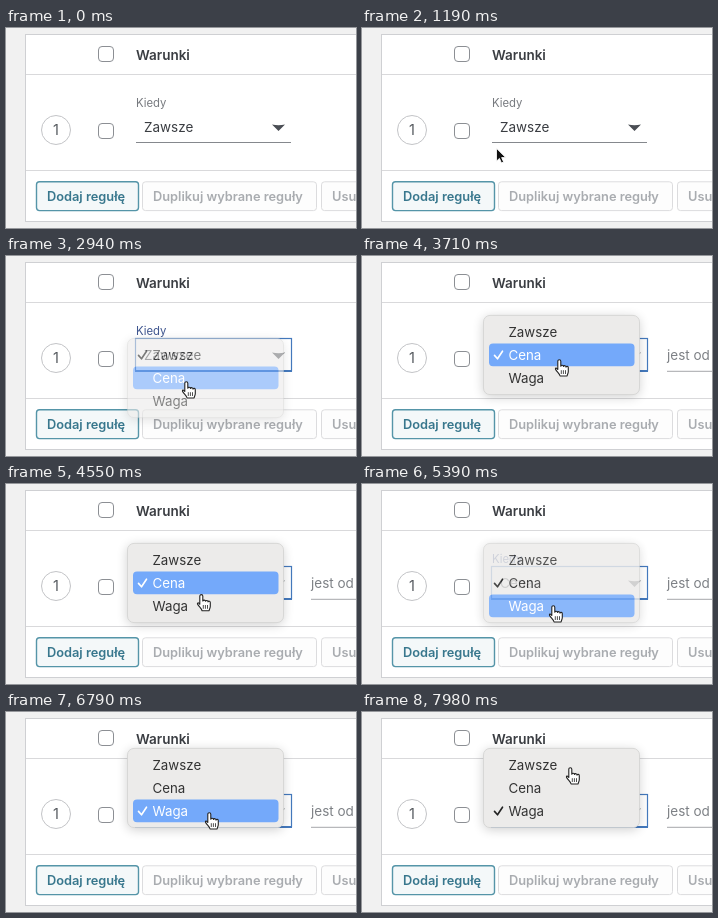
An HTML page that plays this animation: 350 px wide and 200 px high, repeating every 8 s.

```html
<!DOCTYPE html>
<html lang="pl">
<head>
<meta charset="utf-8">
<title>Warunki</title>
<style>
html, body { margin: 0; width: 100%; height: 100%; overflow: hidden; background: #f1f1f1; }
svg { display: block; width: 100%; height: 100%; }
text { font-family: Inter, Roboto, "Liberation Sans", sans-serif; fill: #3a3d42; }
.line { stroke: #d9d9db; fill: none; }
.box { fill: #fff; stroke: #8c8f94; }
.btn text { font-size: 12.8px; font-weight: 600; fill: #a9acb0; }
.btn rect { fill: #fdfdfd; stroke: #dcdcde; }
.btn.main text { fill: #38778d; }
.btn.main rect { fill: #f4f8f9; stroke: #5595a8; stroke-width: 1.4; }
.value { font-size: 13.5px; }
.item { font-size: 13.3px; }
</style>
</head>
<body>
<svg viewBox="0 0 350 200">
  <defs>
    <filter id="blur" x="-20%" y="-30%" width="140%" height="160%">
      <feGaussianBlur stdDeviation="5.5"/>
    </filter>
  </defs>

  <rect width="350" height="200" fill="#f1f1f1"/>
  <rect x="19.5" y="6.5" width="340" height="187" fill="#fff" stroke="#cfd0d3"/>
  <path class="line" d="M20 46.5H350M20 142.5H350"/>

  <rect class="box" x="92.5" y="18.5" width="15" height="15" rx="3.5"/>
  <rect class="box" x="92.5" y="95.5" width="15" height="15" rx="3.5"/>
  <text x="130" y="32" font-size="13.5" font-weight="600">Warunki</text>
  <circle cx="50" cy="102" r="14.5" fill="#fff" stroke="#c3c4c7"/>
  <text x="50" y="107.3" font-size="14.5" text-anchor="middle" style="fill:#55595e">1</text>

  <g class="btn main">
    <rect x="30.5" y="153.8" width="102" height="28.8" rx="3"/>
    <text x="41" y="172.9">Dodaj regułę</text>
  </g>
  <g class="btn">
    <rect x="136.5" y="153.8" width="174" height="28.8" rx="3"/>
    <text x="147" y="172.9">Duplikuj wybrane reguły</text>
    <rect x="315.5" y="153.8" width="130" height="28.8" rx="3"/>
    <text x="326" y="172.9">Usuń wybrane</text>
  </g>

  <text id="label" x="130" y="78.5" font-size="11.3">Kiedy</text>
  <path d="M130 114.5H285" stroke="#85888d"/>
  <g id="focus" fill="none" stroke="#4479bd">
    <rect x="129.5" y="82.5" width="156" height="32.2" stroke-width="1.2"/>
    <path d="M129 115H286" stroke-width="2"/>
  </g>
  <text id="value" class="value" x="138" y="104.3"></text>
  <path d="M266 96.5q6.5 1.6 13 0L272.5 103z" fill="#4a4e54"/>
  <g id="extra">
    <text class="value" x="305" y="103.9" style="fill:#7d8085">jest od</text>
    <path d="M305 115.3H350" stroke="#a5a7ab"/>
  </g>

  <g id="menu">
    <rect x="121" y="2" width="156.5" height="80" rx="7" opacity=".18" filter="url(#blur)"/>
    <rect x="121.5" y=".4" width="156" height="79.2" rx="6.5" fill="#ecebea" stroke="#d2d2d1" stroke-width=".8"/>
    <rect id="bar" x="127" width="145.5" height="22.8" rx="4" fill="#74a9fa"/>
    <g id="items"></g>
    <path id="check" d="M132.5 12.8l3 3.4 5-7.6" fill="none" stroke-width="1.6" stroke-linecap="round" stroke-linejoin="round"/>
  </g>

  <g id="cursor">
    <path id="arrow" d="M0 0V13l3-2.8 2 4.6 2.2-1-2-4.4H9.3z" fill="#111" stroke="#fff" stroke-width=".9"/>
    <g id="hand" transform="translate(.3 1)" stroke="#222" stroke-linejoin="round" stroke-linecap="round">
      <path fill="#fff" stroke-width="1.1" d="M-1.5 9.5V1.3a1.5 1.5 0 0 1 3 0V6.2a1.4 1.4 0 0 1 2.7 .3a1.3 1.3 0 0 1 2.5 .6a1.2 1.2 0 0 1 2.3 .6V11.5c0 2-1 2.6-1.2 4.5H.8C.3 13.6-2 12.3-3.6 9.6c-.9-1.5 .8-2.4 2.1-.1z"/>
      <path fill="none" stroke-width=".8" d="M2 10.6v3M4.1 10.6v3M6.2 10.6v3"/>
    </g>
  </g>
</svg>
<script>
const LOOP = 8000, STEP = 70, ROW = 23, PAD = 5.4;
const OPTIONS = ['Zawsze', 'Cena', 'Waga'];
// Each visit to the menu: checked row, chosen row, opening and click times
const VISITS = [
  { from: 0, to: 1, open: 1610, pick: 2660 },
  { from: 1, to: 2, open: 3570, pick: 5180 },
  { from: 2, to: 0, open: 6300, pick: 7980 }
];
// Pointer stops: time, x, y
const PATH = [
  [630, -10, 158], [1470, 185, 107], [2030, 185, 107], [2520, 180, 125],
  [2940, 180, 125], [3430, 197, 103], [4060, 197, 103], [4550, 195, 109.8],
  [4900, 191, 121], [5390, 191, 121], [5810, 203, 100], [7140, 203, 100],
  [7840, 208, 55]
];

const $ = id => document.getElementById(id);
const show = (el, on) => el.setAttribute('visibility', on ? 'inherit' : 'hidden');
const clamp = (v, lo, hi) => Math.min(hi, Math.max(lo, v));

const rows = OPTIONS.map((name, i) => {
  const el = document.createElementNS('http://www.w3.org/2000/svg', 'text');
  el.setAttribute('class', 'item');
  el.setAttribute('x', 146.5);
  el.setAttribute('y', PAD + ROW * i + 16.6);
  el.textContent = name;
  $('items').append(el);
  return el;
});

function pointer(t) {
  const i = PATH.findIndex(p => p[0] > t);
  if (i === 0) return PATH[0].slice(1);
  if (i < 0) return PATH[PATH.length - 1].slice(1);
  const [t0, x0, y0] = PATH[i - 1], [t1, x1, y1] = PATH[i];
  const u = (t - t0) / (t1 - t0), e = u * u * (3 - 2 * u);
  return [x0 + (x1 - x0) * e, y0 + (y1 - y0) * e];
}

function drawMenu(t, y) {
  const visit = VISITS.find(v => t >= v.open && t < v.pick + 460);
  show($('menu'), visit);
  if (!visit) return;
  const since = t - visit.pick;
  const top = 82 - ROW * visit.from;
  let active = clamp(Math.floor((y - top - PAD) / ROW), 0, 2);
  if (since >= 0) active = since < STEP ? -1 : visit.to;

  $('menu').setAttribute('transform', `translate(0 ${top})`);
  $('menu').setAttribute('opacity', clamp(1 - (since - 160) / 300, 0, 1));
  show($('bar'), active >= 0);
  $('bar').setAttribute('y', PAD + ROW * Math.max(active, 0));
  rows.forEach((el, i) => { el.style.fill = i === active ? '#fff' : '#333'; });
  $('check').setAttribute('transform', `translate(0 ${PAD + ROW * visit.from - 0.8})`);
  $('check').setAttribute('stroke', active === visit.from ? '#fff' : '#222');
}

function draw(time) {
  const t = Math.floor((time % LOOP) / STEP) * STEP;
  const [x, y] = pointer(t);
  const chosen = VISITS.reduce((now, v) => t >= v.pick + 350 ? v.to : now, 0);
  const focused = t >= 1540;

  $('value').textContent = OPTIONS[chosen];
  $('label').style.fill = focused ? '#3f568f' : '#777a7f';
  show($('focus'), focused);
  show($('extra'), chosen > 0);
  drawMenu(t, y);

  const overButton = y > 153 && x > 30 && x < 133;
  const overField = x > 129 && y < 115;
  const hand = focused || overButton || overField;
  show($('cursor'), t >= 700);
  show($('hand'), hand);
  show($('arrow'), !hand);
  $('cursor').setAttribute('transform', `translate(${x} ${y})`);
}

const start = performance.now();
function tick() {
  draw(performance.now() - start);
  requestAnimationFrame(tick);
}
tick();
</script>
</body>
</html>
```
